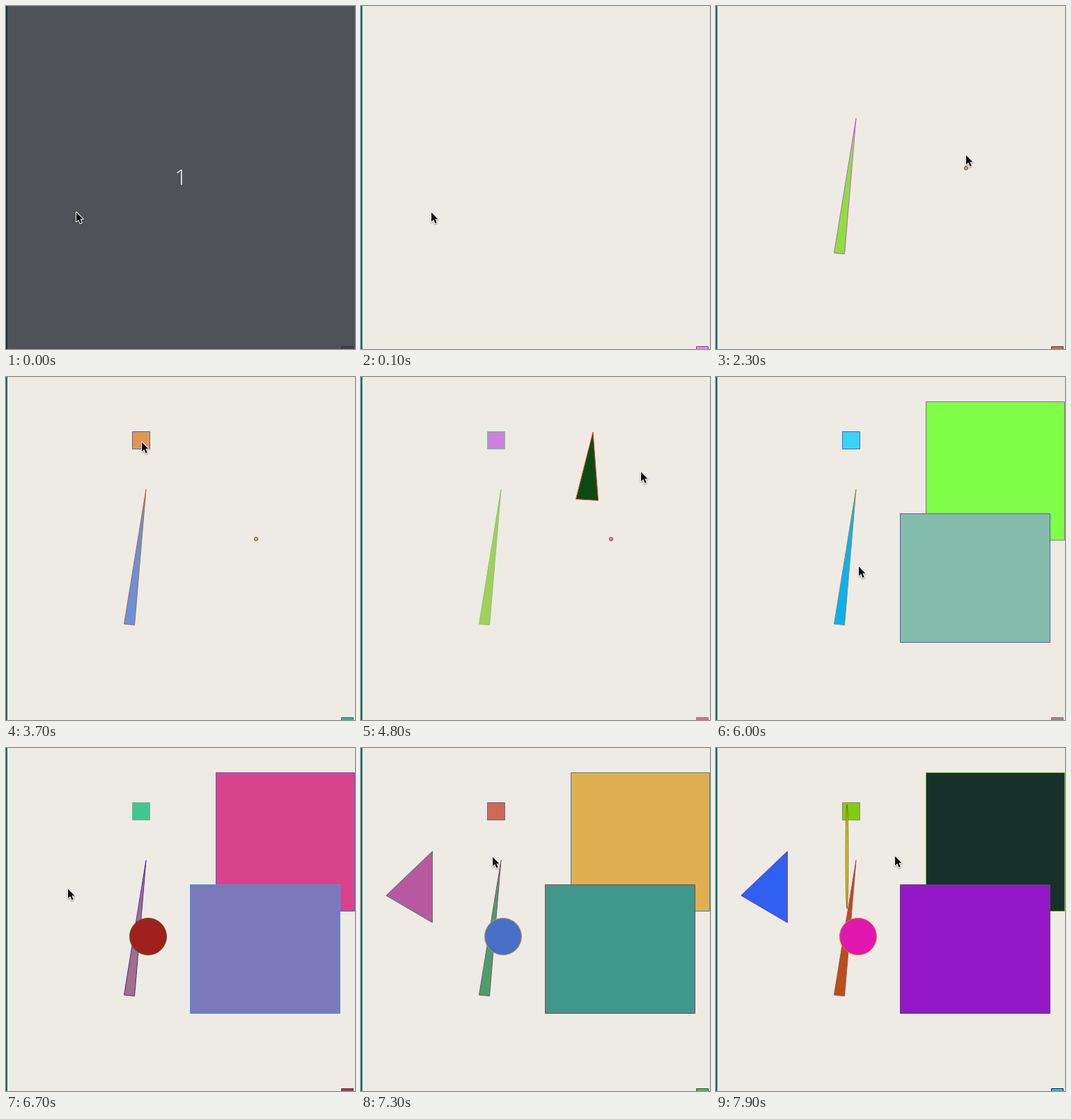
Recreate the animation shown at these times as an HTML page with a canvas. Size 501x493 px, loop 8 s.

```html
<!DOCTYPE html>
<html lang="en">
<head>
<meta charset="utf-8">
<title>Random shapes</title>
<style>
html, body { margin: 0; width: 100%; height: 100%; overflow: hidden; background: #eeebe4; }
canvas { display: block; }
</style>
</head>
<body>
<canvas id="stage" width="501" height="493"></canvas>
<script>
const ctx = document.getElementById('stage').getContext('2d');
const LOOP = 8000, STEP = 100;

const poly = (...pts) => () => {
  ctx.beginPath();
  for (let i = 0; i < pts.length; i += 2) ctx.lineTo(pts[i], pts[i + 1]);
  ctx.closePath();
};
const box = (x, y, w, h) => poly(x, y, x + w, y, x + w, y + h, x, y + h);
const oval = (x, y, rx, ry) => () => {
  ctx.beginPath();
  ctx.ellipse(x, y, rx, ry, 0, 0, Math.PI * 2);
};

// In the order they are added, back to front
const shapes = [
  box(481.5, 489.5, 17, 9),
  poly(201, 161.5, 169.5, 355, 184.5, 356.5),
  oval(359, 233, 2.6, 2.6),
  box(181.5, 78.5, 25, 25),
  poly(333, 79, 308.5, 175.5, 340.5, 177.5),
  box(301.5, 35.5, 199, 199),
  box(264.5, 196.5, 215, 185),
  oval(204, 271, 26.5, 26.5),
  poly(102.5, 148.5, 36, 212, 102.5, 251),
  oval(188, 156, 1.7, 75)
];

// Each redraw gives every shape a new fill and stroke: [time, 'fill stroke', ...]
const redraws = [
  [0, '#d49cd8 #a41cb0'],
  [800, '#5088c0 #304878', '#d8a048 #3878b0'],
  [1900, '#d86838 #404c60', '#8ce03c #c45cc8', '#b8a478 #70583c'],
  [3700, '#48a890 #3c7060', '#6c90d8 #b06840', '#e0c050 #705030', '#e09850 #5860b0'],
  [4600, '#e86484 #d85878', '#a0d05c #8cc468', '#f080a8 #a03864', '#cc82dc #58d868', '#0c4a14 #e04828'],
  [5100, '#70a050 #486838', '#d06890 #508860', '#70b8c0 #404860', '#d8c048 #705890',
    '#804828 #3080a0', '#58a0d8 #a07040'],
  [5800, '#9c848c #8c7480', '#0cb0f4 #8c8c50', '#c09060 #604880', '#38d4f4 #4c64cc',
    '#804828 #3080a0', '#80ff48 #a064a0', '#84bcac #6458b8'],
  [6200, '#983c4c #803444', '#a07088 #5424a4', '#c09060 #604880', '#40c890 #88b078',
    '#804828 #3080a0', '#d8448c #6454cc', '#7c78bc #38a0e0', '#a02020 #44681c'],
  [6900, '#50b070 #386048', '#48a068 #904878', '#c09060 #604880', '#d06858 #507898',
    '#804828 #3080a0', '#e0b050 #408090', '#40988c #904060', '#4870c8 #c09840', '#b858a0 #408060'],
  [7500, '#20bcdc #103440', '#b85018 #a84858', '#c09060 #604880', '#84cc10 #888888',
    '#804828 #3080a0', '#18302c #70b414', '#9418c8 #505058', '#e018b0 #e87420',
    '#3060f0 #7430a8', '#e8c81c #7c6808']
];

// Pointer moves: [start, end, x, y]
const moves = [
  [0, 0, 101, 297],
  [100, 200, 142, 295],
  [300, 400, 186, 292],
  [1300, 1600, 359, 235],
  [2200, 2600, 359, 104],
  [2800, 3400, 195, 94],
  [3900, 4400, 328, 145],
  [4700, 4800, 402, 137],
  [5100, 5500, 373, 290],
  [5800, 6000, 205, 273],
  [6400, 6700, 89, 203],
  [7100, 7300, 189, 157],
  [7600, 7700, 225, 157],
  [7800, 7900, 257, 156]
];

const smooth = p => p * p * (3 - 2 * p);

function pointerAt(t) {
  let [, , x, y] = moves[0];
  for (const [start, end, toX, toY] of moves.slice(1)) {
    if (t <= start) break;
    const p = smooth(Math.min(1, (t - start) / (end - start)));
    x += (toX - x) * p;
    y += (toY - y) * p;
  }
  return [Math.round(x), Math.round(y)];
}

const arrow = poly(0, 0, 0, 13.5, 3.2, 10.6, 5.5, 16, 7.8, 15, 5.5, 9.8, 9.5, 9.8);

function drawPointer(t) {
  const [x, y] = pointerAt(t);
  ctx.save();
  ctx.translate(x, y - 0.5);
  arrow();
  ctx.shadowColor = 'rgba(0,0,0,.4)';
  ctx.shadowBlur = 2;
  ctx.shadowOffsetY = 1;
  ctx.strokeStyle = '#fff';
  ctx.lineWidth = 2;
  ctx.lineJoin = 'round';
  ctx.stroke();
  ctx.shadowColor = 'transparent';
  ctx.fillStyle = '#0c0c0c';
  ctx.fill();
  ctx.restore();
}

function drawCountdown() {
  ctx.fillStyle = 'rgba(26,32,40,.75)';
  ctx.fillRect(0, 0, 501, 493);
  ctx.fillStyle = '#fff';
  ctx.font = '300 31px "Open Sans", sans-serif';
  ctx.textAlign = 'center';
  ctx.fillText('1', 251, 257);
}

function draw(t) {
  ctx.fillStyle = '#eeebe4';
  ctx.fillRect(0, 0, 501, 493);
  ctx.fillStyle = '#00706f';
  ctx.fillRect(0, 0, 2, 493);
  const [, ...colors] = redraws.filter(r => r[0] <= t).pop();
  ctx.lineWidth = 1;
  ctx.lineJoin = 'bevel';
  colors.forEach((pair, i) => {
    [ctx.fillStyle, ctx.strokeStyle] = pair.split(' ');
    shapes[i]();
    ctx.fill();
    ctx.stroke();
  });
  if (t < 100) drawCountdown();
  drawPointer(t);
}

const began = performance.now();
function tick() {
  const t = (performance.now() - began) % LOOP;
  draw(Math.floor(t / STEP) * STEP);
  requestAnimationFrame(tick);
}
tick();
</script>
</body>
</html>
```
